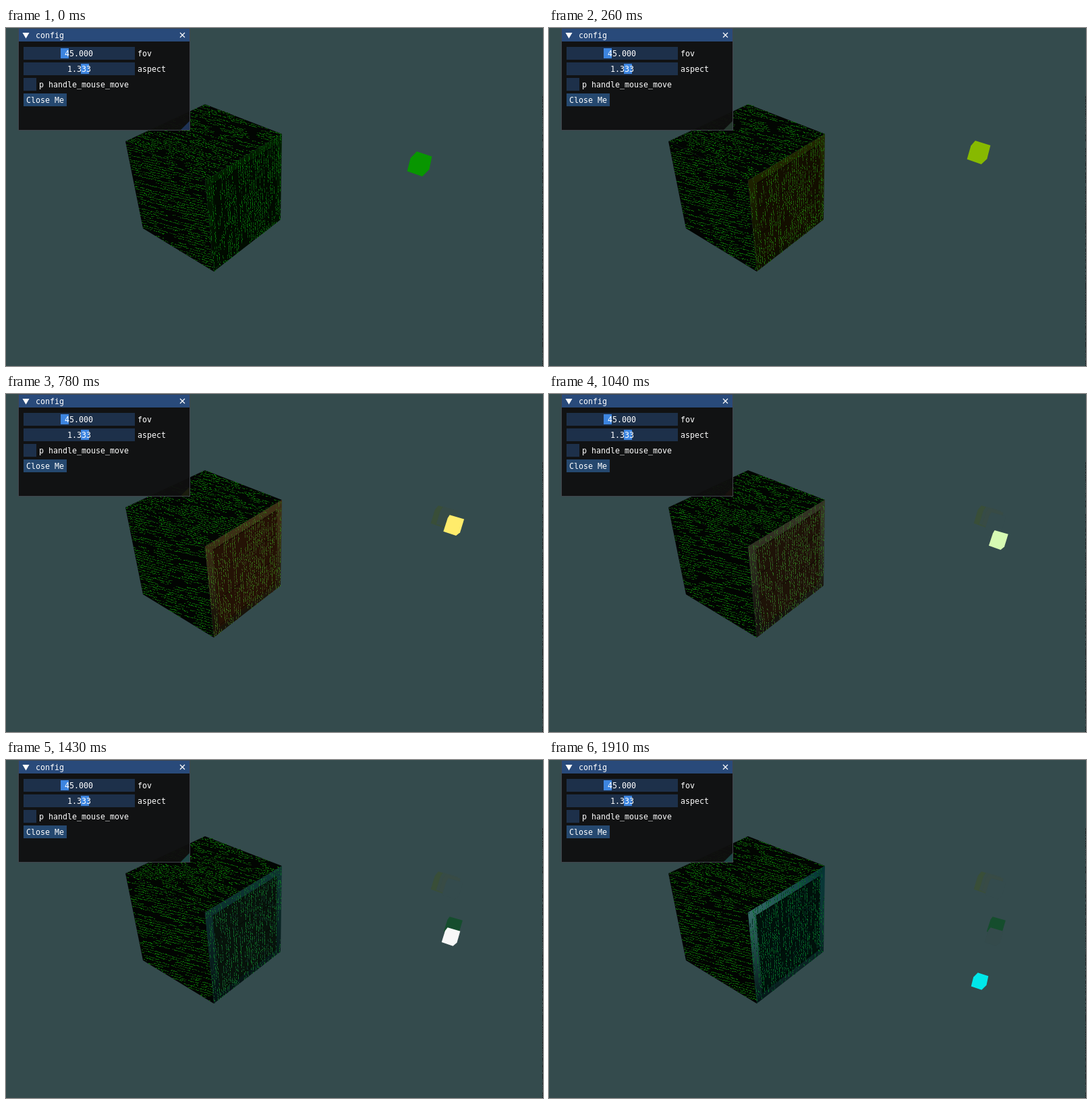
An HTML page with a canvas for the animation above (1.98 s loop, 796 px wide and 501 px high).

```html
<!DOCTYPE html>
<html lang="en">
<head>
<meta charset="utf-8">
<title>Lit cube</title>
<style>
  html, body { margin: 0; width: 100%; height: 100%; overflow: hidden; background: #344b4d; }
  canvas, svg { position: absolute; left: 0; top: 0; }
  text { font: 11.63px "DejaVu Sans Mono", monospace; fill: #fff; white-space: pre; }
  rect { shape-rendering: crispEdges; }
  .field { fill: #1d304a; }
  .grab { fill: #3d85e0; }
</style>
</head>
<body>
<canvas id="scene" width="796" height="501"></canvas>
<svg width="796" height="501">
  <rect x="18" y="0" width="255" height="152" fill="#0f0f0f" fill-opacity=".94"/>
  <rect x="19" y="1" width="253" height="19" fill="#294a7a"/>
  <path id="grip" d="M272 138V151H259Z"/>
  <rect x="18.5" y=".5" width="254" height="151" fill="none" stroke="#41454c"/>
  <path d="M24.5 7H34.5L29.5 15.5Z" fill="#fff"/>
  <path d="M258 7L265 14M265 7L258 14" stroke="#fff" stroke-width="1.2"/>
  <rect class="field" x="26" y="28" width="165" height="19"/>
  <rect class="grab" x="81" y="30" width="12" height="15"/>
  <rect class="field" x="26" y="51" width="165" height="19"/>
  <rect class="grab" x="111" y="53" width="12" height="15"/>
  <rect class="field" x="26" y="74" width="19" height="19"/>
  <rect x="26" y="97" width="64" height="19" fill="#25486f"/>
  <text x="44" y="15">config</text>
  <text x="87" y="42">45.000</text>
  <text x="195" y="42">fov</text>
  <text x="91" y="65">1.333</text>
  <text x="195" y="65">aspect</text>
  <text x="49" y="88">p handle_mouse_move</text>
  <text x="30" y="111">Close Me</text>
</svg>
<script>
const ctx = document.getElementById('scene').getContext('2d');
const grip = document.getElementById('grip');
const BACKGROUND = '#344b4d';
const LOOP = 1980;

// Lamp path: step, centre x, centre y, half size
const LAMP = [
  [0, 613, 201.5, 18.4], [2, 637, 184.5, 17.4], [4, 654, 183, 16.2], [6, 663.7, 194.7, 15.4],
  [8, 666.3, 216.5, 14.4], [11, 659.5, 262, 13.8], [15, 638.5, 328, 12.8]
];
const GRIP = [[0, '#1e3356'], [1, '#26392f'], [3, '#1f2a12'], [5, '#1a1c0e'], [7, '#18120e'], [10, '#1d4644']];

// Corners in the order (0,0) (1,0) (1,1) (0,1); glyph columns run along v
const TOP = [[177, 168], [295, 113], [409, 157], [295, 226]];
const LEFT = [[177, 168], [203, 297], [308, 361], [295, 226]];
const RIGHT = [[295, 226], [409, 157], [407, 284], [308, 361]];

const rgb = c => `rgb(${c.map(v => Math.round(v)).join()})`;
const mix = (a, b, t) => a + (b - a) * t;

function hash(a, b) {
  const s = Math.sin(a * 127.1 + b * 311.7) * 43758.5453;
  return s - Math.floor(s);
}

function stepAt(t) {
  if (t < 1430) return Math.floor(t / 130);
  return t < 1580 ? 11 : Math.min(15, 12 + Math.floor((t - 1580) / 110));
}

// Cubic Hermite through the lamp keys
function lampAt(step) {
  let i = 0;
  while (i < LAMP.length - 2 && LAMP[i + 1][0] <= step) i++;
  const a = LAMP[i], b = LAMP[i + 1], span = b[0] - a[0], s = (step - a[0]) / span;
  const slope = (j, n) => {
    const p = LAMP[Math.max(0, j - 1)], q = LAMP[Math.min(LAMP.length - 1, j + 1)];
    return (q[n] - p[n]) / (q[0] - p[0]);
  };
  const r = 1 - s;
  return [1, 2, 3].map(n =>
    (1 + 2 * s) * r * r * a[n] + s * r * r * span * slope(i, n) +
    s * s * (3 - 2 * s) * b[n] - s * s * r * span * slope(i + 1, n));
}

function lightAt(step) {
  return [0.03 + 0.264 * step, 0.63 + 0.092 * step, -0.6 + 0.172 * step]
    .map(angle => 255 * Math.max(0, Math.sin(angle)));
}

function polygon(points, fill) {
  ctx.beginPath();
  points.forEach(p => ctx.lineTo(p[0], p[1]));
  ctx.closePath();
  ctx.fillStyle = fill;
  ctx.fill();
}

// The lamp's narrow side turns away from the viewer halfway through
function drawLamp(step, fill) {
  const [x, y, size] = lampAt(step), turn = Math.sin(Math.PI * step / 15);
  const shape = [[-0.22 - 0.18 * turn, -1], [1, -0.6], [0.78 - 0.18 * turn, 0.45 + 0.25 * turn],
                 [0.22, 1], [-1, 0.58], [-0.73 + 0.15 * turn, -0.48 - 0.22 * turn]];
  polygon(shape.map(([u, v]) => [x + u * size, y + v * size]), fill);
}

function facePoint([a, b, c, d], u, v) {
  return [0, 1].map(n => mix(mix(a[n], b[n], u), mix(d[n], c[n], u), v));
}

// Rows of code; slant tilts them across the face
function drawGlyphs(face, seed, step, slant, red, blue) {
  const upright = face === RIGHT, columns = 36, rows = 72, scroll = step * 9;
  for (let i = 0; i < columns; i++) {
    const density = 0.5 + 0.45 * hash(i, seed);
    for (let j = 0; j < rows; j++) {
      const row = j + scroll, v = (j + 0.5) / rows;
      const run = hash(i + seed * 50, Math.floor((row + i * 3) / 8));
      if (run > density || hash(i + seed * 90, row) > 0.8) continue;
      const jitter = 0.4 * hash(row, i + seed * 7);
      const u = ((i + 0.3 + jitter) / columns + slant * v + 1) % 1;
      const [x, y] = facePoint(face, u, v);
      const green = 40 + 85 * hash(row, i + seed);
      ctx.fillStyle = rgb([red + 4, green, blue]);
      ctx.fillRect(Math.round(x - 0.5), Math.round(y - 0.5), upright ? 1 : 2, upright ? 2 : 1);
    }
  }
}

function drawLitFace(step, light) {
  const inset = (u, v) => facePoint(RIGHT, u, v);
  const tint = k => rgb([light[0] * k * 1.2, light[1] * k, light[2] * k]);
  const frame = ctx.createLinearGradient(320, 205, 355, 325);
  frame.addColorStop(0, tint(0.2));
  frame.addColorStop(1, tint(0.08));
  polygon(RIGHT, frame);
  if (step > 11) {
    const glow = ctx.createRadialGradient(295, 226, 0, 295, 226, 140);
    glow.addColorStop(0, `rgba(120,190,180,${0.11 * (step - 11)})`);
    glow.addColorStop(1, 'rgba(120,190,180,0)');
    polygon(RIGHT, glow);
  }
  polygon([inset(0.09, 0.08), inset(0.94, 0.08), inset(0.94, 0.94), inset(0.09, 0.94)],
    rgb([light[0] * 0.14, light[1] * 0.075, light[2] * 0.045]));
  ctx.strokeStyle = 'rgba(0,0,0,.5)';
  for (const v of [0.09, 0.36, 0.64, 0.92]) {
    ctx.beginPath();
    ctx.moveTo(...inset(0.09, v));
    ctx.lineTo(...inset(0.94, v));
    ctx.stroke();
  }
  drawGlyphs(RIGHT, 3, step, 0, light[0] * 0.2, 10 + light[2] * 0.12);
}

function drawResidue(step) {
  if (step >= 5) {
    drawLamp(3, '#394e38');
    drawLamp(4, '#364b47');
  }
  if (step >= 7) drawLamp(4.6, '#384b45');
  if (step >= 8) drawLamp(5.5, BACKGROUND);
  if (step >= 11) drawLamp(10, '#154d2d');
  if (step >= 12) drawLamp(11, '#344a4b');
}

function draw(step) {
  const light = lightAt(step);
  ctx.fillStyle = BACKGROUND;
  ctx.fillRect(0, 0, 796, 501);
  for (let y = 98; y < 501; y++) {
    ctx.fillStyle = hash(y, 5) < 0.6 ? '#1c2223' : '#3c4a4b';
    ctx.fillRect(795, y, 1, 1);
  }

  polygon(TOP, '#020502');
  polygon(LEFT, '#020402');
  drawGlyphs(TOP, 1, step, 0.15, 6, 6);
  drawGlyphs(LEFT, 2, step, -0.25, 6, 6);
  drawLitFace(step, light);

  drawResidue(step);
  drawLamp(step, step === 11 ? '#f8f8f8' : rgb(light));
  grip.setAttribute('fill', GRIP.filter(([from]) => from <= step).pop()[1]);
}

let shown = -1;
const start = performance.now();
function tick() {
  const step = stepAt((performance.now() - start) % LOOP);
  if (step !== shown) draw(shown = step);
  requestAnimationFrame(tick);
}
tick();
</script>
</body>
</html>
```
